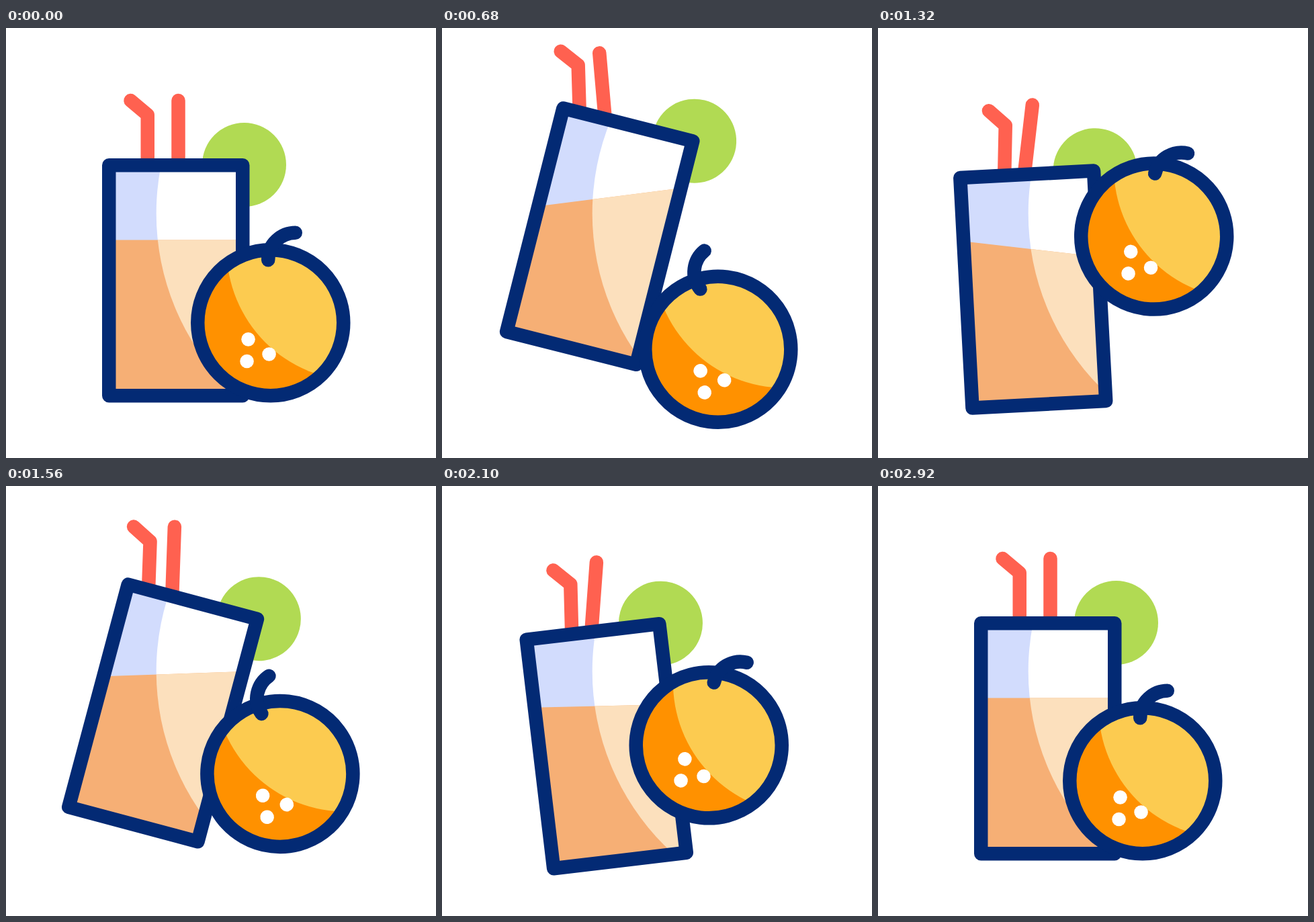
An HTML page for the animation above (3000 ms loop, 640 by 640 pixels).

```html
<!DOCTYPE html>
<html lang="en">
<head>
<meta charset="utf-8">
<title>Juice and orange</title>
<style>
  html, body { margin: 0; width: 100%; height: 100%; overflow: hidden; background: #fff; }
  svg { display: block; width: 100%; height: 100%; }
  .line { fill: none; stroke-width: 20.5; stroke-linecap: round; stroke-linejoin: round; }
  .navy { stroke: #032a74; }
  .red { stroke: #ff6150; }
</style>
</head>
<body>
<svg viewBox="0 0 640 640">
  <defs>
    <clipPath id="glassClip"><rect id="glassArea" x="-99.5" y="-171.5" width="199" height="343"/></clipPath>
    <clipPath id="juiceClip"><rect id="juiceArea" x="-300" y="0" width="600" height="500"/></clipPath>
    <clipPath id="orangeClip"><circle r="108.5"/></clipPath>
  </defs>

  <g id="back">
    <circle cx="101.75" cy="-172.25" r="62.5" fill="#b1da53"/>
    <path id="bentStraw" class="line red" d="M-67.25-267.75L-42-246.5V-140"/>
    <path id="straightStraw" class="line red" d="M3.75-267.75V-140"/>
  </g>

  <!-- the shine stays still while the glass moves over it -->
  <g clip-path="url(#glassClip)">
    <rect width="640" height="640" fill="#d2dcfd"/>
    <circle cx="589.7" cy="276" r="366" fill="#fff"/>
    <g clip-path="url(#juiceClip)">
      <rect width="640" height="640" fill="#f6af75"/>
      <circle cx="589.7" cy="276" r="366" fill="#fce0bd"/>
    </g>
  </g>
  <rect id="glass" class="line navy" x="-99.5" y="-171.5" width="199" height="343"/>

  <g id="orange">
    <g clip-path="url(#orangeClip)">
      <circle r="108.5" fill="#ff9100"/>
      <circle cx="130.6" cy="-109.7" r="196" fill="#fccb50"/>
    </g>
    <g fill="#fff">
      <circle cx="-33.2" cy="24.6" r="10.3"/>
      <circle cx="-2.2" cy="46.8" r="10.3"/>
      <circle cx="-35.2" cy="57.2" r="10.3"/>
    </g>
    <circle class="line navy" r="108.5"/>
    <path id="stem" class="line navy" d="M-3.5-93.5C-4-117 16-134 37-134"/>
  </g>
</svg>
<script>
const LOOP = 3000;
const times = [120, 400, 680, 890, 1040, 1160, 1320, 1570, 1820, 2020, 2100, 2430, 2800, 2920];

// Smooth curve through the keys that never overshoots them.
function track(...values) {
  const slope = i => (values[i + 1] - values[i]) / (times[i + 1] - times[i]);
  const tangents = values.map((_, i) => {
    if (i === 0 || i === values.length - 1) return 0;
    const a = slope(i - 1), b = slope(i);
    return a * b > 0 ? 2 * a * b / (a + b) : 0;
  });
  return t => {
    if (t <= times[0]) return values[0];
    const next = times.findIndex(k => k > t);
    if (next < 0) return values[values.length - 1];
    const i = next - 1, span = times[next] - times[i], u = (t - times[i]) / span;
    const ease = u * u * (3 - 2 * u);
    return values[i] + (values[next] - values[i]) * ease
      + span * u * (1 - u) * (tangents[i] * (1 - u) - tangents[next] * u);
  };
}

const tilt = track(0, 4.5, 14.2, 18, -0.3, -12.5, -3.1, 15, 1.7, -8, -6.8, 4.5, 0, 0);
const glassX = track(0, -5, -18, -29, -20, -34, -22, -19, -6.5, -15, -8, -9, 0, 0);
const glassY = track(0, -22, -65.5, -81, -12.5, 33, 13.5, -38, -5.5, 14, 11.5, -5, 0, 0);
const orangeX = track(0, 4, 17, 26, 12.5, 37, 17, 14, 9.5, 9, 3.5, 0, 0, 0);
const orangeY = track(0, 12, 39.5, 50, -92, -175, -129, -10, -39, -57, -53, 13, 0, 0);
const juiceTilt = track(0, -7, -21.4, -25, 1, 16, 9.7, -17, -2.6, 6.5, 5.4, -5, 0, 0);
const stemTilt = track(0, -8, -24.5, -28, 2.5, 19, 10.5, -19, -1.4, 8.5, 6.8, -6, 2, 0);
const bentTilt = track(0, -5, -15.9, -19, -0.9, 11, 4.3, -13, -1.25, 6, 5.3, -4, 0.5, 0);
const straightTilt = track(0, -6, -19.2, -22, 4.2, 14, 9.7, -13, 0.4, 11.5, 11, -3, 0.5, 0);
const straightShift = track(0, 0.25, 0.7, 0.85, 1, 1, 1, 1, 1, 1, 1, 0.4, 0, 0);

const place = (id, transform) =>
  document.getElementById(id).setAttribute('transform', transform);

function draw(t) {
  const angle = tilt(t), shift = straightShift(t);
  const glass = `translate(${252.75 + glassX(t)} ${375.75 + glassY(t)}) rotate(${angle})`;
  for (const id of ['back', 'glassArea', 'glass']) place(id, glass);
  place('juiceArea', `${glass} translate(0 -60.25) rotate(${juiceTilt(t)})`);
  place('bentStraw', `rotate(${bentTilt(t)} -42 -58)`);
  place('straightStraw',
    `translate(${-19.5 * shift} ${-9 * shift}) rotate(${straightTilt(t)} 3.75 -93)`);
  place('orange',
    `translate(${393.75 + orangeX(t)} ${438.75 + orangeY(t)}) rotate(${-angle})`);
  place('stem', `rotate(${stemTilt(t)} -3.5 -93.5)`);
}

function tick() {
  draw(performance.now() % LOOP);
  requestAnimationFrame(tick);
}
tick();
</script>
</body>
</html>
```
